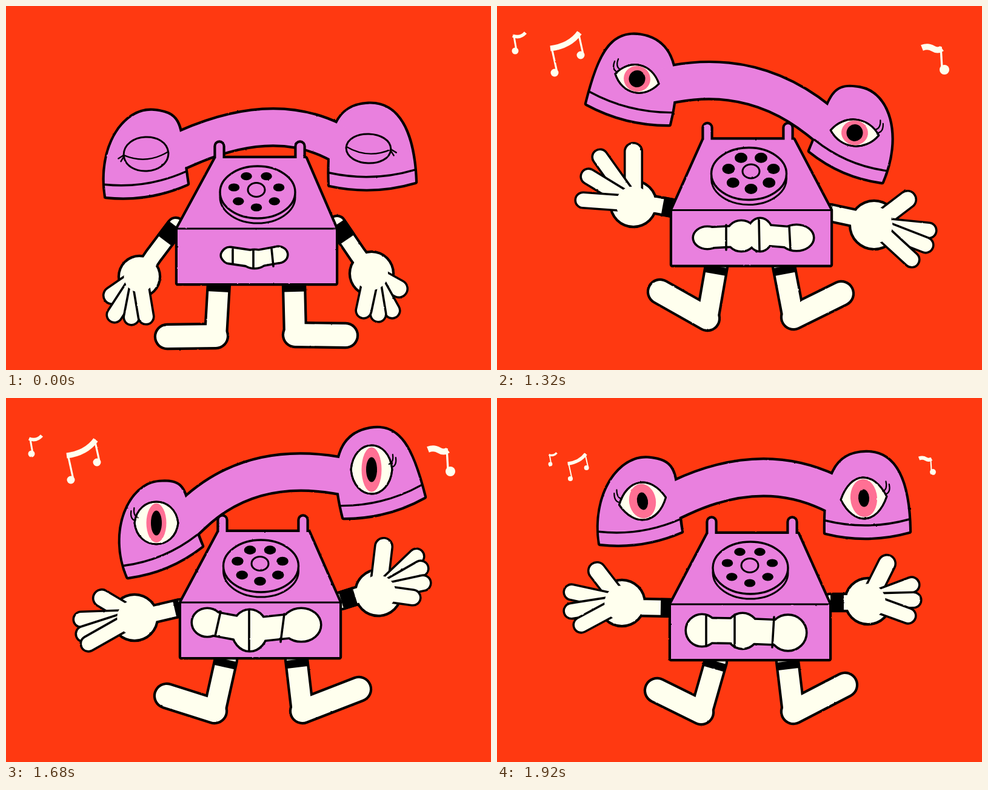
An HTML page for the animation above (2.04 s loop, 800 by 600 pixels).

```html
<!DOCTYPE html>
<html lang="en">
<head>
<meta charset="utf-8">
<title>Ringing telephone</title>
<style>
html, body { margin: 0; width: 100%; height: 100%; overflow: hidden; background: #ff3911; }
svg { display: block; width: 100vw; height: 100vh; stroke-linecap: round; stroke-linejoin: round; }
</style>
</head>
<body>
<svg id="stage" viewBox="0 0 800 600">
  <filter id="ink" filterUnits="userSpaceOnUse" x="0" y="0" width="800" height="600" color-interpolation-filters="sRGB">
    <feTurbulence type="fractalNoise" baseFrequency="0.2" numOctaves="1" seed="4"/>
    <feDisplacementMap in="SourceGraphic" scale="2" xChannelSelector="R" yChannelSelector="G"/>
  </filter>
</svg>
<script>
const PINK = '#e980de', CREAM = '#ffffee', IRIS = '#ff7094', BLACK = '#000', LINE = 4.2;

// Geometry: points are [x, y].
const add = (p, v, k = 1) => [p[0] + v[0] * k, p[1] + v[1] * k];
const middle = (a, b) => [(a[0] + b[0]) / 2, (a[1] + b[1]) / 2];
function toward(a, b) {
  const d = Math.hypot(b[0] - a[0], b[1] - a[1]);
  return [(b[0] - a[0]) / d, (b[1] - a[1]) / d];
}

// Path data.
const poly = (...pts) => 'M' + pts.join('L');
const dot = p => `M${p}h.01`;
const ring = (x, y, rx, ry) =>
  `M${x - rx},${y}a${rx},${ry} 0 1 1 ${2 * rx},0a${rx},${ry} 0 1 1 ${-2 * rx},0Z`;
function arc(a, m, b) { // parabola through three points
  const c = add(add(m, m), middle(a, b), -1);
  return `M${a}Q${c} ${b}`;
}

// Drawing.
const stroke = (d, width = 3, color = BLACK, cap = 'round') =>
  `<path d="${d}" fill="none" stroke="${color}" stroke-width="${width}" stroke-linecap="${cap}"/>`;
const area = (d, fill, width = 0) =>
  `<path d="${d}" fill="${fill}" stroke="#000" stroke-width="${width}"/>`;

// Joins parts into one silhouette: all outlines first, then all colours.
// A part has a path, a pen width (0 for a filled area) and a line cap.
function merge(parts, color, line = LINE) {
  const layer = (c, grow) => parts.map(([d, w = 0, cap]) =>
    (w ? '' : area(d, c)) + stroke(d, w + grow, c, cap)).join('');
  return layer(BLACK, 2 * line) + layer(color, 0);
}

function arm({ from, wrist, palm, tips, sleeve = 16, r = 36 }) {
  const fingers = tips.map((tip, i) => merge([[poly(palm, tip), i ? 22 : 25]], CREAM, 3.6));
  return merge([[poly(from, wrist, palm), 24], [dot(palm), 2 * r]], CREAM) +
    fingers.join('') + stroke(dot(palm), 1.6 * r, CREAM) +
    stroke(poly(from, add(from, toward(from, wrist), sleeve)), 32, BLACK, 'butt');
}

function leg([hip, heel, toe]) {
  const sock = add(hip, toward(hip, heel), 13);
  return merge([[poly(hip, heel), 32], [poly(heel, toe), 36]], CREAM) +
    stroke(poly(hip, sock), 38, BLACK, 'butt');
}

// One end of the handset: a dome over the base from outer to inner corner.
function cup({ outer, inner, tilt }) {
  const side = Math.sign(inner[0] - outer[0]), a = tilt * Math.PI / 180;
  const along = toward(outer, inner);
  const up = [along[1] * side, -along[0] * side];
  const top = add(middle(outer, inner), [Math.sin(a), -Math.cos(a)], 131);
  const across = [Math.cos(a) * side, Math.sin(a) * side];
  const sag = lift => add(middle(outer, inner), up, lift - 18);
  return {
    dome: `M${outer}C${add(outer, up, 82)} ${add(top, across, -49)} ${top}` +
      `C${add(top, across, 52)} ${add(inner, up, 92)} ${inner}Q${sag(0)} ${outer}Z`,
    band: `M${add(outer, up, 20)}Q${sag(20)} ${add(inner, up, 20)}`
  };
}

function handset(ends, spine) {
  const cups = ends.map(cup);
  return merge([...cups.map(c => [c.dome]), [arc(...spine), 57, 'square']], PINK) +
    cups.map(c => stroke(c.band, 3.4)).join('');
}

// An almond, rounder as "round" nears 1; side is -1 on the left, 1 on the right.
function eye({ at: [x, y], w, h, turn = 0 }, side, { round, iris, pupil }) {
  const lid = v => `${-w * round},${v} ${w * round},${v} `;
  const rim = `M${-w},0C${lid(-h * 4 / 3)}${w},0C${w * round},${h * 4 / 3} ${-w * round},${h * 4 / 3} ${-w},0Z`;
  const lash = k => stroke(`M${side * (w * 0.85 + k)},${k - 9}q${side * 8},-3 ${side * 6},-16`, 2.2);
  const open = () => area(ring(0, 0, iris, h * 0.92), IRIS) + area(ring(0, 0, ...pupil), BLACK) +
    stroke(rim) + lash(0) + lash(5);
  const shut = () => stroke(`M${-side * w},-2Q0,18 ${side * w},0l${side * 9},5m${-side * 10},-4l${side * 6},9`, 2.4);
  return `<g transform="translate(${x} ${y}) rotate(${turn})">` +
    area(rim, iris ? CREAM : PINK, 3) + (iris ? open() : shut()) + '</g>';
}

function dial(x, y, hub, hole) {
  let s = area(ring(x, y + 8, 62, 43), PINK, 3) + area(ring(x, y, 62, 43), PINK, 3.4) +
    area(ring(...hub, 14, 11.5), PINK, 3);
  for (let i = 0; i < 7; i++) {
    const a = Math.PI / 2 + i * 2 * Math.PI / 7;
    s += area(ring(hub[0] + 38 * Math.cos(a), hub[1] + 2 + 27 * Math.sin(a), ...hole), BLACK);
  }
  return s;
}

// x, y: left end of the seam; lean: how far the top is set in.
function body({ x, y, lean, hole }) {
  const left = x + lean + 1, right = left + 148, top = y - 116;
  const box = poly([x + 2, y], [left, top], [right, top], [x + 263, y], [x + 263, y + 90], [x + 2, y + 90]) + 'Z';
  const prong = px => [poly([px, top - 20], [px, top + 10]), 11];
  return merge([[box], prong(left + 6), prong(right - 9)], PINK) +
    stroke(poly([x, y], [x + 265, y]), 3.2) +
    dial(x + 102 + lean / 2, y - 60, [x + 132, y - 64], hole);
}

// Teeth are lobes strung on a band; gaps are lines from top to bottom.
const mouth = ({ band, lobes, gaps }) =>
  merge([[poly(...lobes.map(l => l.slice(0, 2))), band], ...lobes.map(l => [ring(...l)])], CREAM, 3.6) +
  gaps.map(([x, top, bottom, slant = 0]) => stroke(poly([x, top], [x + slant, bottom]), 3.6)).join('');

// Notes hang from their first head at 0,0.
const head = (x, y, r) => area(ring(x, y, r, r), CREAM);
const pen = (d, width) => stroke(d, width, CREAM, 'butt');
const NOTES = [
  head(0, 0, 5.5) + pen('M2,-1L-2,-24', 3) + pen('M-4,-25Q8,-20 17,-30', 5.5),
  head(0, 0, 6.5) + head(43, -29, 6.5) + pen('M4,-1L-5,-42M47,-31L39,-67', 3.2) + pen('M-7,-40Q25,-44 41,-66', 9),
  head(0, 0, 8) + pen('M-4,-3L-6,-38', 3.4) + pen('M-37,-36q10,-4 18,1t15,0', 10)
];
const music = (places, size = 1) => places.map((p, i) =>
  `<g transform="translate(${p}) scale(${size})">${NOTES[i]}</g>`).join('');

const pose = p => p.arms.map(arm).join('') + p.legs.map(leg).join('') +
  handset(p.cups, p.spine) + p.eyes.map((e, i) => eye(e, i ? 1 : -1, p.look)).join('') +
  body(p.body) + mouth(p.mouth) + (p.notes ? music(p.notes, p.size) : '');

const rest = {
  arms: [
    { from: [280, 363], wrist: [243, 412], palm: [220, 446], sleeve: 30, r: 32,
      tips: [[175, 477], [179, 509], [207, 513], [231, 512]] },
    { from: [546, 360], wrist: [580, 410], palm: [603, 441], sleeve: 30, r: 34,
      tips: [[648, 466], [637, 502], [614, 508], [590, 502]] }
  ],
  legs: [[[351, 458], [346, 544], [266, 545]], [[475, 458], [477, 542], [560, 543]]],
  cups: [{ outer: [165, 314], inner: [299, 293], tilt: 5 }, { outer: [675, 290], inner: [534, 295], tilt: -3 }],
  spine: [[300, 233], [430, 200], [541, 223]],
  eyes: [{ at: [231, 244], w: 37, h: 28, turn: -3 }, { at: [598, 235], w: 37, h: 24, turn: 2 }],
  look: { round: 0.95 },
  body: { x: 281, y: 367, lean: 64, hole: [9.3, 6.6] },
  mouth: {
    band: 24, lobes: [[369, 411, 13, 10], [410, 417, 20, 14], [449, 410, 14, 12]],
    gaps: [[374, 401, 424], [408, 403, 431], [438, 400, 429, 3]]
  }
};

const swingRight = {
  arms: [
    { from: [287, 346], wrist: [240, 357], palm: [212, 362], sleeve: 9,
      tips: [[158, 330], [124, 365], [128, 389], [136, 405]] },
    { from: [553, 334], wrist: [585, 324], palm: [614, 321], sleeve: 24,
      tips: [[623, 245], [677, 261], [684, 281], [688, 305], [671, 329]] }
  ],
  legs: [[[363, 431], [344, 516], [265, 491]], [[479, 431], [489, 516], [582, 480]]],
  cups: [{ outer: [201, 295], inner: [323, 244], tilt: -4 }, { outer: [690, 163], inner: [557, 197], tilt: -10 }],
  spine: [[310, 190], [415, 131], [544, 127]],
  eyes: [{ at: [248, 206], w: 36, h: 35 }, { at: [603, 118], w: 34, h: 40 }],
  look: { round: 0.85, iris: 16.5, pupil: [9, 20.5] },
  body: { x: 287, y: 337, lean: 63, hole: [9.8, 7.3] },
  mouth: {
    band: 36, lobes: [[332, 370, 24, 22], [402, 383, 28, 33], [487, 374, 31, 26]],
    gaps: [[354, 352, 392, -9], [401, 349, 417], [459, 356, 402, -6]]
  },
  notes: [[42, 92], [107, 135], [733, 121]]
};

const swingLeft = {
  arms: [
    { from: [289, 333], wrist: [262, 328], palm: [225, 326],
      tips: [[225, 240], [170, 249], [151, 281], [142, 320]] },
    { from: [550, 341], wrist: [592, 350], palm: [622, 361], sleeve: 1, r: 38,
      tips: [[677, 319], [712, 370], [707, 394], [684, 418]] }
  ],
  legs: [[[362, 429], [347, 515], [269, 471]], [[473, 429], [489, 513], [568, 474]]],
  cups: [{ outer: [148, 161], inner: [284, 195], tilt: 9 }, { outer: [635, 290], inner: [516, 239], tilt: 10 }],
  spine: [[293, 128], [418, 131], [530, 188]],
  eyes: [{ at: [231, 120], w: 37, h: 23, turn: 13 }, { at: [590, 209], w: 40, h: 22, turn: 6 }],
  look: { round: 0.5, iris: 22, pupil: [13.5, 14] },
  body: { x: 287, y: 336.5, lean: 53, hole: [10.5, 8.5] },
  mouth: {
    band: 31, lobes: [[347, 382, 22, 17], [403, 379, 24, 24], [434, 377, 20, 26], [494, 382, 27, 20]],
    gaps: [[378, 361, 402], [432, 351, 403, 1], [482, 363, 401, 2]]
  },
  notes: [[30, 74], [95, 110], [738, 105]]
};

const settle = {
  arms: [
    { from: [286, 346], wrist: [234, 345], palm: [206, 338],
      tips: [[165, 285], [123, 320], [123, 351], [139, 374]] },
    { from: [550, 337], wrist: [585, 337], palm: [612, 335], sleeve: 22,
      tips: [[643, 273], [684, 308], [687, 333], [678, 359]] }
  ],
  legs: [[[361, 434], [337, 518], [264, 482]], [[479, 434], [489, 517], [574, 473]]],
  cups: [{ outer: [170, 240], inner: [304, 220], tilt: 6 }, { outer: [680, 220], inner: [542, 222], tilt: -1 }],
  spine: [[303, 164], [430, 131], [547, 155]],
  eyes: [{ at: [240, 170], w: 39, h: 31, turn: -9 }, { at: [605, 165], w: 38, h: 34, turn: -4 }],
  look: { round: 0.5, iris: 22, pupil: [9, 14.5] },
  body: { x: 285, y: 340, lean: 62, hole: [9.3, 6.6] },
  mouth: {
    band: 38, lobes: [[338, 383, 25, 25], [405, 384, 26, 28], [480, 387, 29, 28]],
    gaps: [[345, 359, 409], [392, 357, 411], [457, 361, 411, -3]]
  },
  notes: [[88, 109], [121, 133], [719, 122]], size: 0.62
};

const stage = document.getElementById('stage');
const scenes = [rest, swingRight, swingLeft, settle].map(p => {
  const g = document.createElementNS('http://www.w3.org/2000/svg', 'g');
  g.innerHTML = pose(p);
  g.setAttribute('filter', 'url(#ink)');
  stage.append(g);
  return g;
});

// A long rest, then seven quick beats of ringing.
const LOOP = 2040, REST = 1200, BEAT = 120;

function sceneAt(t) {
  if (t < REST) return 0;
  const beat = Math.floor((t - REST) / BEAT);
  return beat === 6 ? 3 : 1 + beat % 2;
}

function draw() {
  const current = sceneAt(performance.now() % LOOP);
  scenes.forEach((g, i) => g.style.display = i === current ? '' : 'none');
  requestAnimationFrame(draw);
}
draw();
</script>
</body>
</html>
```
